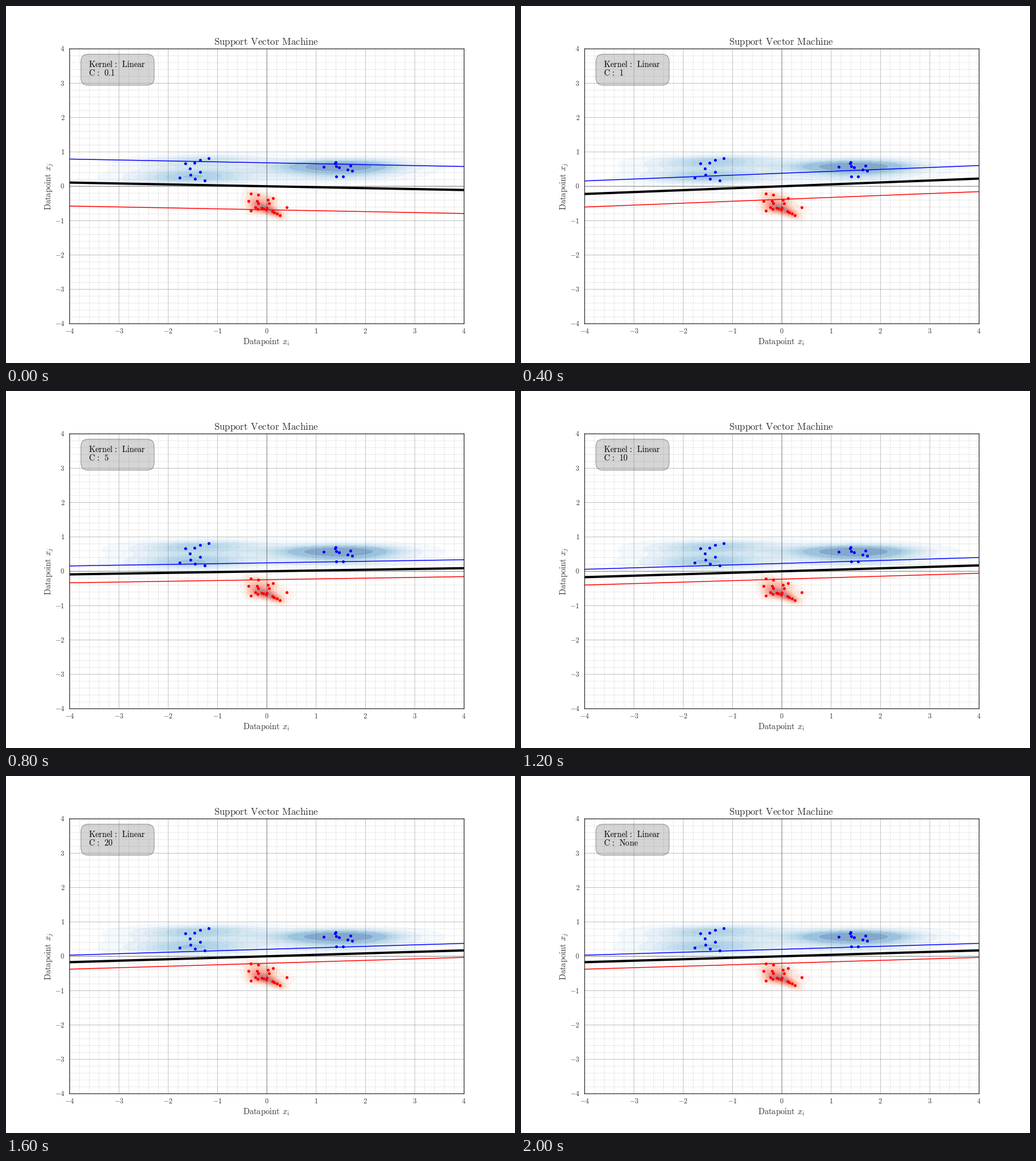
A matplotlib script for the animation above (2.4 s loop, 894 px wide and 626 px high).

```python
import numpy as np
import matplotlib.pyplot as plt
from matplotlib.animation import FuncAnimation
from matplotlib.colors import ListedColormap
from matplotlib.patches import FancyBboxPatch
from matplotlib.ticker import MultipleLocator
from matplotlib.transforms import IdentityTransform

W, H, DPI = 894, 626, 64
PT = 72 / DPI  # points per pixel
INK = "#333333"
PENALTIES = ["0.1", "1", "5", "10", "20", "None"]

plt.rcParams["mathtext.fontset"] = "cm"
plt.rcParams["path.snap"] = False

np.random.seed(100)


def cluster(n, x, y):
    return np.random.randn(n, 2) * .2 + [x, y]


BLUE = np.vstack([cluster(10, 1.5, .5), cluster(10, -1.5, .5)])
RED = cluster(20, 0, -.5)


def fit(limit):
    """Weights of a soft-margin linear classifier, by pairwise ascent."""
    pts = np.vstack([BLUE, RED])
    t = np.repeat([1., -1.], [len(BLUE), len(RED)])
    a, w = np.zeros(len(t)), np.zeros(2)
    for _ in range(20000):
        err = t - pts @ w
        room_up = np.where(t > 0, limit - a, a)
        room_down = np.where(t > 0, a, limit - a)
        i = np.where(room_up > 1e-9, err, -np.inf).argmax()
        j = np.where(room_down > 1e-9, err, np.inf).argmin()
        if err[i] - err[j] < 1e-4:
            break
        d = pts[i] - pts[j]
        step = min((err[i] - err[j]) / (d @ d), room_up[i], room_down[j])
        a[i] += t[i] * step
        a[j] -= t[j] * step
        w += step * d
    return w


WEIGHTS = [fit(np.inf if c == "None" else float(c)) for c in PENALTIES]

fig = plt.figure(figsize=(W / DPI, H / DPI), dpi=DPI, facecolor="white")
ax = fig.add_axes([.125, .11, .775, .77])
for axis in (ax.xaxis, ax.yaxis):
    axis.set_major_locator(MultipleLocator(1))
    axis.set_minor_locator(MultipleLocator(.2))
ax.tick_params(which="both", length=0, labelbottom=False, labelleft=False)
ax.grid(which="major", color="#666666", alpha=.5, lw=.83 * PT)
ax.grid(which="minor", color="#999999", alpha=.35, lw=.83 * PT, ls="--")
for line in (ax.axhline, ax.axvline):
    line(0, color="black", alpha=.4, lw=.83 * PT, zorder=1.6)
for spine in ax.spines.values():
    spine.set_linewidth(PT)


def label(x, y, text, size, ha="left", color=INK, **kw):
    """Place math text with its baseline at pixel (x, y) from the top left."""
    return fig.text(x / W, 1 - y / H, f"${text}$", fontsize=size * PT,
                    ha=ha, va="baseline", color=color, **kw)


def roman(text):
    return r"\hspace{0.38}".join(rf"\mathrm{{{w}}}" for w in text.split())


def entry(name, value):
    return roman(name) + r"\hspace{0.116}:\hspace{0.495}" + roman(value)


def pale(name):
    """Colour map mixed half and half with white."""
    return ListedColormap(.5 + .5 * plt.get_cmap(name)(np.linspace(0, 1, 256)))


def density(pts, cmap):
    """Filled Gaussian density with contours at equal shares of the mass."""
    cov = np.cov(pts.T) * len(pts) ** (-1 / 3)
    inv = np.linalg.inv(cov)
    cut = 3 * np.sqrt(np.diag(cov))
    lo, hi = pts.min(0) - cut, pts.max(0) + cut
    gx, gy = np.meshgrid(*(np.linspace(a, b, 200) for a, b in zip(lo, hi)))
    z = np.zeros_like(gx)
    for px, py in pts:
        dx, dy = gx - px, gy - py
        z += np.exp(-.5 * (inv[0, 0] * dx * dx + 2 * inv[0, 1] * dx * dy
                           + inv[1, 1] * dy * dy))
    ranked = np.sort(z.ravel())[::-1]
    share = np.cumsum(ranked) / ranked.sum()
    idx = np.searchsorted(share, 1 - np.linspace(.05, 1, 10))
    return ax.contourf(gx, gy, z, levels=ranked[idx], cmap=pale(cmap),
                       zorder=1)


# The first clouds leave out the upper left and the rightmost outlier.
first = [density(np.delete(BLUE, (BLUE @ [1, -1]).argmin(), 0), "Blues"),
         density(np.delete(RED, RED[:, 0].argmax(), 0), "Reds")]
rest = [density(BLUE, "Blues"), density(RED, "Reds")]
ax.set(xlim=(-4, 4), ylim=(-4, 4))

edge = np.array([-4, 4])
upper, = ax.plot(edge, edge, color="blue", lw=1.5 * PT, zorder=2)
lower, = ax.plot(edge, edge, color="red", lw=1.5 * PT, zorder=2)
middle, = ax.plot(edge, edge, color="black", lw=4 * PT, zorder=2.1)
for pts, color in ((BLUE, "blue"), (RED, "red")):
    ax.plot(*pts.T, "o", color=color, ms=5.1 * PT, mew=0, zorder=3)

for v in range(-4, 5):
    label(458 + 86.6 * v, 574.5, v, 12.2, "center")
    label(103, 320.3 - 60.25 * v, v, 12.2, "right")
label(457, 68, roman("Support Vector Machine"), 16.9, "center")
label(457.3, 592.5, roman("Datapoint") + r"\hspace{0.38}x_i", 14.5, "center")
label(79.3, 316, roman("Datapoint") + r"\hspace{0.38}x_j", 14.5, "center",
      rotation=90, rotation_mode="anchor")

fig.add_artist(FancyBboxPatch(
    (131.6, H - 139), 128.6, 54.6, boxstyle="round,pad=0,rounding_size=13",
    fc=(.5, .5, .5, .33), ec=(0, 0, 0, .35), lw=1.1 * PT,
    transform=IdentityTransform(), zorder=1))
label(145, 107, entry("Kernel", "Linear"), 14.4, color="black")
penalty = label(145, 121.6, entry("C", PENALTIES[0]), 14.4, color="black")


def update(i):
    wx, wy = WEIGHTS[i]
    for line, side in ((upper, 1), (middle, 0), (lower, -1)):
        line.set_ydata((side - wx * edge) / wy)
    penalty.set_text(f"${entry('C', PENALTIES[i])}$")
    for cloud in first:
        cloud.set_visible(i == 0)
    for cloud in rest:
        cloud.set_visible(i > 0)
    return upper, lower, middle, penalty, *first, *rest


anim = FuncAnimation(fig, update, frames=len(PENALTIES), interval=400,
                     init_func=lambda: update(0), repeat=True, repeat_delay=0)
plt.show()
```
